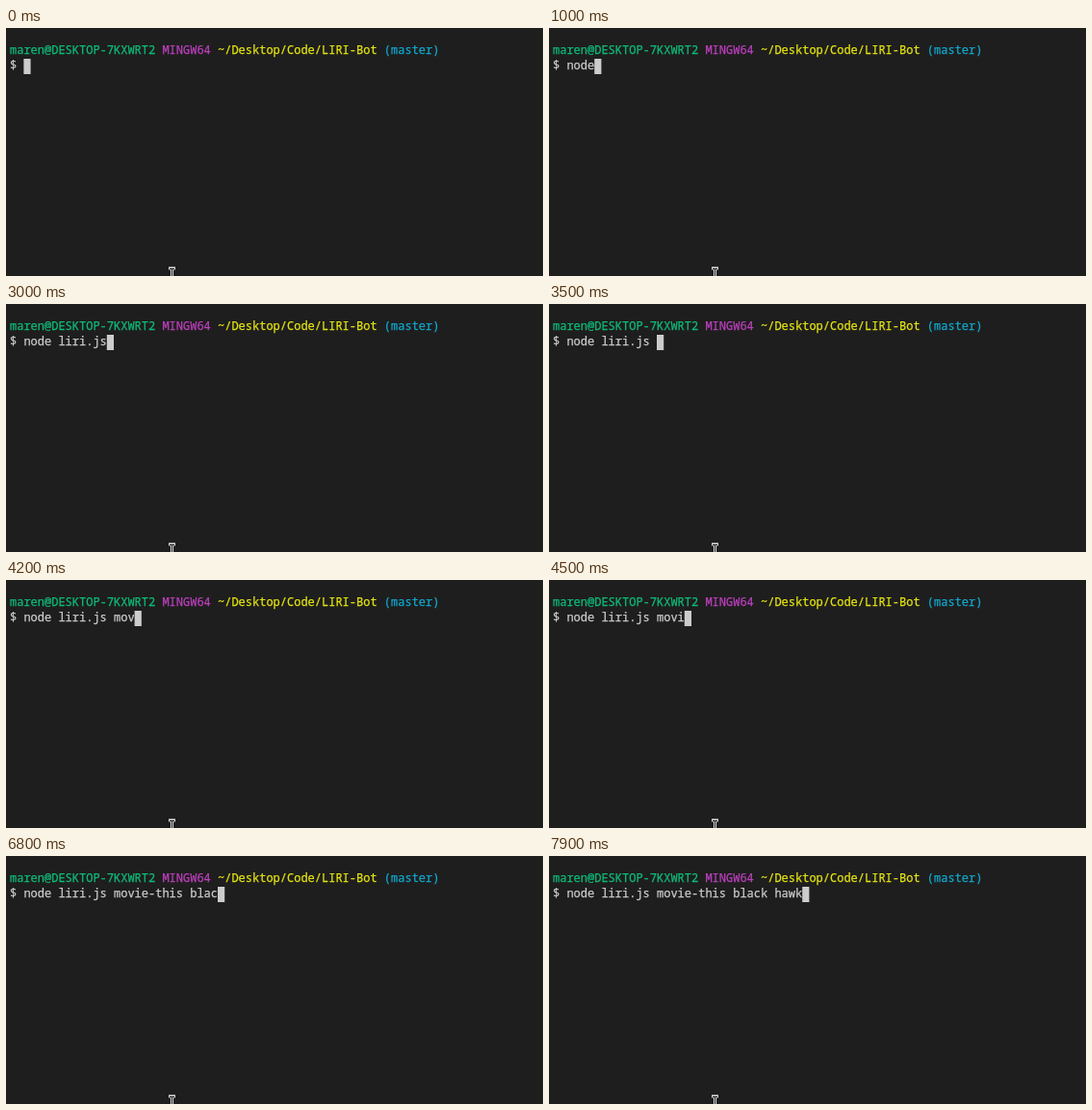
An HTML page for the animation above (8000 ms loop, 558x258 px).

```html
<!DOCTYPE html>
<html lang="en">
<head>
<meta charset="utf-8">
<title>Terminal</title>
<style>
  html, body { margin: 0; width: 100%; height: 100%; overflow: hidden; background: #1e1e1e; }
  svg { display: block; color: #ccc; }
  text { font: 12px "Noto Sans Mono", "DejaVu Sans Mono", monospace; white-space: pre; }
  text, tspan { fill: currentColor; stroke: currentColor; stroke-width: .25px; }
  .user { color: #0dbc79; }
  .system { color: #bc3fbc; }
  .path { color: #e5e510; }
  .branch { color: #11a8cd; }
</style>
</head>
<body>
<svg width="558" height="258" viewBox="0 0 558 258">
  <text x="4" y="27"><tspan class="user">maren@DESKTOP-7KXWRT2</tspan> <tspan class="system">MINGW64</tspan> <tspan class="path">~/Desktop/Code/LIRI-Bot</tspan> <tspan class="branch">(master)</tspan></text>
  <text id="line" x="4" y="43">$ </text>
  <rect id="caret" y="32" width="7.2" height="16" fill="currentColor"/>
  <g id="pointer" fill="none">
    <path d="M169 250h7M172.5 249v9" stroke="#ddd" stroke-width="3"/>
    <path d="M170 250.5h5M172.5 250v8" stroke="#1e1e1e"/>
  </g>
</svg>
<script>
const LOOP = 8000, CELL = 7.2, LEFT = 4, TICK = 100;
// Each burst of typing: its text, when it begins and the pause per key
const bursts = [
  { text: "node ", from: 500, pace: 175 },
  { text: "liri.j", from: 1500, pace: 200 },
  { text: "s ", from: 3000, pace: 100 },
  { text: "movie-", from: 3800, pace: 240 },
  { text: "this ", from: 5400, pace: 140 },
  { text: "black ", from: 6300, pace: 160 },
  { text: "hawk", from: 7300, pace: 200 }
];
const line = document.getElementById("line");
const caret = document.getElementById("caret");
const start = performance.now();

function typedAt(time) {
  return bursts.map(({ text, from, pace }) =>
    [...text].filter((_, i) => Math.floor((from + i * pace) / TICK) * TICK <= time).join("")
  ).join("");
}

function draw() {
  const shown = "$ " + typedAt((performance.now() - start) % LOOP);
  line.textContent = shown;
  caret.setAttribute("x", LEFT + shown.length * CELL);
  requestAnimationFrame(draw);
}
draw();
</script>
</body>
</html>
```
